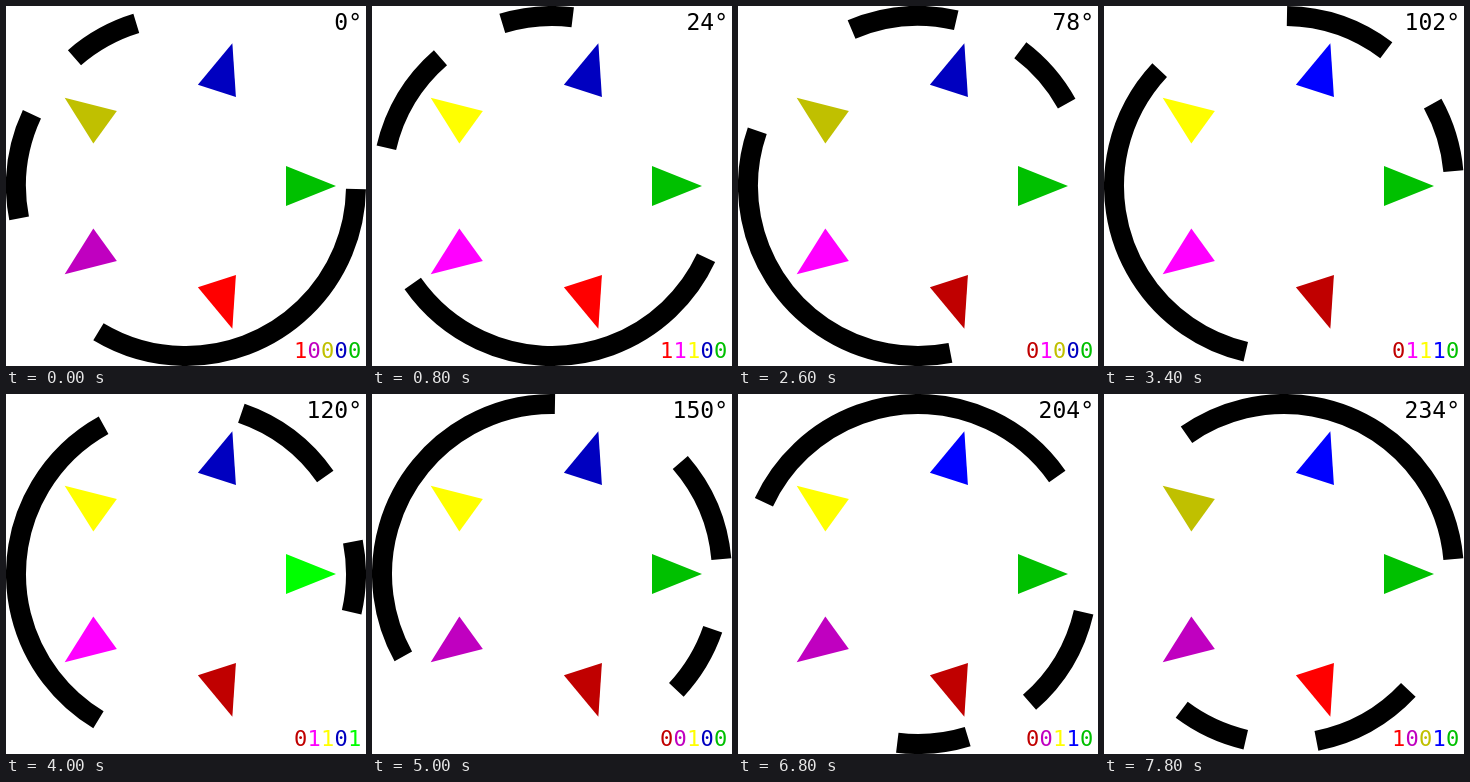
Animation of 360 by 360 pixels, one loop 8000 ms. Source, as an HTML page with a canvas:

```html
<!DOCTYPE html>
<html lang="en">
<head>
<meta charset="utf-8">
<title>Single-track Gray code</title>
<style>
html, body { margin: 0; width: 100%; height: 100%; overflow: hidden; background: #fff; }
canvas { display: block; }
</style>
</head>
<body>
<canvas id="stage" width="360" height="360"></canvas>
<script>
const ctx = document.getElementById('stage').getContext('2d');
const RAD = Math.PI / 180;
const STEP_MS = 200, STEP_DEG = 6, STEPS = 40;
const CENTER = 180;

// Track segments as [start, length] in degrees, clockwise from the right.
const TRACK = [[1, 120], [169, 36], [229, 24]];

// Sensors sit 72 degrees apart; colours are [off, on].
const SENSORS = [
  { angle: 72, colors: ['#c00000', '#ff0000'] },
  { angle: 144, colors: ['#c000c0', '#ff00ff'] },
  { angle: 216, colors: ['#c0c000', '#ffff00'] },
  { angle: 288, colors: ['#0000c0', '#0000ff'] },
  { angle: 0, colors: ['#00c000', '#00ff00'] }
];

function readBit(angle, turn) {
  return TRACK.some(([start, length]) => (angle - turn - start + 720) % 360 < length) ? 1 : 0;
}

function drawTrack(turn) {
  ctx.lineWidth = 20;
  ctx.strokeStyle = '#000';
  for (const [start, length] of TRACK) {
    ctx.beginPath();
    ctx.arc(CENTER, CENTER, 170, (start + turn) * RAD, (start + length + turn) * RAD);
    ctx.stroke();
  }
}

function drawSensor(angle, color) {
  ctx.save();
  ctx.translate(CENTER, CENTER);
  ctx.rotate(angle * RAD);
  ctx.fillStyle = color;
  ctx.beginPath();
  ctx.moveTo(150, 0);
  ctx.lineTo(100, 20);
  ctx.lineTo(100, -20);
  ctx.fill();
  ctx.restore();
}

function label(text, x, y, color) {
  ctx.fillStyle = color;
  ctx.fillText(text, x, y);
}

function draw(time) {
  const turn = Math.floor(time / STEP_MS) % STEPS * STEP_DEG;
  ctx.fillStyle = '#fff';
  ctx.fillRect(0, 0, 360, 360);
  drawTrack(turn);

  ctx.textAlign = 'left';
  ctx.font = '22px "DejaVu Sans Mono", monospace';
  SENSORS.forEach(({ angle, colors }, i) => {
    const bit = readBit(angle, turn);
    drawSensor(angle, colors[bit]);
    label(bit, 288 + i * 13.5, 352, colors[bit]);
  });

  ctx.textAlign = 'right';
  ctx.font = '23px "DejaVu Sans Mono", monospace';
  label(turn + '°', 356, 24, '#000');
}

const origin = performance.now();
function tick() {
  draw(performance.now() - origin);
  requestAnimationFrame(tick);
}
tick();
</script>
</body>
</html>
```
